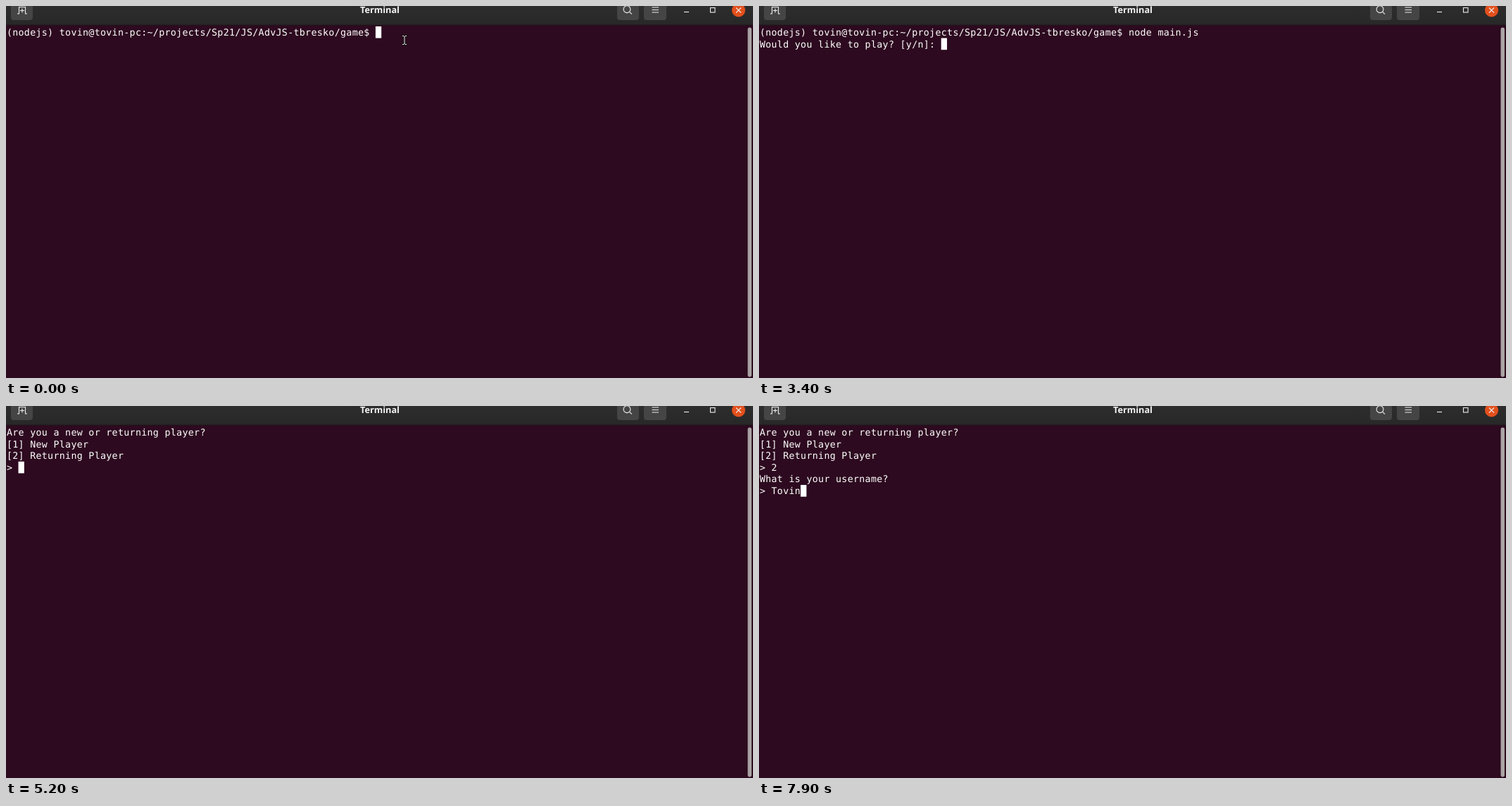
Recreate the animation shown at these times as an HTML page. Size 1061 px wide and 528 px high, loop 8 s.

```html
<!DOCTYPE html>
<html lang="en">
<head>
<meta charset="utf-8">
<title>Terminal</title>
<style>
  html, body { margin: 0; width: 100%; height: 100%; overflow: hidden; background: #2d0a1f; }
  svg { display: block; width: 100vw; height: 100vh; }
  text { fill: #fff; white-space: pre; text-rendering: geometricPrecision; }
  .title { font: bold 12.7px "Noto Sans", "Open Sans", sans-serif; fill: #f4f4f4; text-anchor: middle; }
  #screen text { font: 16px "DejaVu Sans Mono", monospace; letter-spacing: .368px; }
  .button { fill: #454545; }
  .icon { fill: none; stroke: #eee; stroke-width: 1.1; }
</style>
</head>
<body>
<svg viewBox="0 0 1061 528">
  <defs>
    <linearGradient id="bar" x2="0" y2="1">
      <stop stop-color="#2d2d2d"/>
      <stop offset="1" stop-color="#282828"/>
    </linearGradient>
  </defs>
  <rect width="1061" height="528" fill="#2d0a1f"/>
  <rect width="1061" height="27" fill="url(#bar)"/>
  <rect y="26.5" width="1061" height="1" fill="#1e171b"/>

  <g class="button">
    <rect x="7" y="-10" width="31" height="30" rx="4"/>
    <rect x="868" y="-10" width="31" height="30" rx="4"/>
    <rect x="906" y="-10" width="32" height="30" rx="4"/>
  </g>
  <text class="title" x="531" y="10.4">Terminal</text>
  <circle cx="1040.5" cy="6" r="9.5" fill="#e2501d"/>
  <g class="icon">
    <path d="M16 11h2.5V1.5h9V11H30M23 3.5v6M20 6.5h6"/>
    <circle cx="882" cy="4.7" r="4.9"/>
    <path d="M885.6 8.3l3.4 3.4"/>
    <path d="M917.5 2h9.5M917.5 5.5h9.5M917.5 9h9.5"/>
    <path d="M963 8.5h7"/>
    <rect x="1000.5" y="2.5" width="6.5" height="6.5"/>
    <path d="M1037 2.5l7 7M1044 2.5l-7 7"/>
  </g>

  <rect x="1053.5" y="30.5" width="5.5" height="496" rx="2.75" fill="#aaa3a5"/>

  <!-- Character cells are 10 by 20 units -->
  <g id="screen" transform="translate(.9 28.9) scale(.8317)">
    <g id="rows"></g>
    <rect id="caret" width="10" height="20" fill="#fff"/>
  </g>
  <g id="pointer" fill="none">
    <path d="M562.5 42.5h2.5l1 1 1-1h2.5M566 43v11M562.5 54.5h2.5l1-1 1 1h2.5" stroke="#111" stroke-width="2.6"/>
    <path d="M563 42.5h2l1 1 1-1h2M566 43v11M563 54.5h2l1-1 1 1h2" stroke="#eee"/>
  </g>
</svg>
<script>
const LOOP = 8000;
const ROWS = 7;
const prompt = "(nodejs) tovin@tovin-pc:~/projects/Sp21/JS/AdvJS-tbresko/game$ ";
const started = prompt + "node main.js\n";
const question = started + "Would you like to play? [y/n]: ";
const levels = question + "y\nChoose a difficulty:\n[1] Easy\n[2] Medium\n[3] Hard\n> ";
const players = "Are you a new or returning player?\n[1] New Player\n[2] Returning Player\n> ";
const login = players + "2\nWhat is your username?\n> ";

// [start in ms, screen text, caret hidden]
const steps = [
  [0, prompt],
  [700, prompt + "no"],
  [800, prompt + "nod"],
  [1200, prompt + "node "],
  [1700, prompt + "node m"],
  [1800, prompt + "node main.js "],
  [2200, started],
  [2800, question, true],
  [3400, question],
  [4000, question, true],
  [4100, levels],
  [4700, levels, true],
  [5000, levels + "1"],
  [5200, players],
  [5800, players, true],
  [6400, players],
  [6500, players + "2"],
  [6800, login],
  [7300, login + "T"],
  [7700, login + "To"],
  [7800, login + "Tovi"],
  [7900, login + "Tovin"]
];

const byId = id => document.getElementById(id);
const caret = byId("caret");
const pointer = byId("pointer");
const rows = Array.from({ length: ROWS }, (_, i) => {
  const row = document.createElementNS(caret.namespaceURI, "text");
  row.setAttribute("y", 20 * i + 15.7);
  return byId("rows").appendChild(row);
});

let shown;

function show(step) {
  if (step === shown) return;
  shown = step;
  const [, text, hidden] = step;
  const lines = text.split("\n");
  rows.forEach((row, i) => { row.textContent = lines[i] || ""; });
  caret.setAttribute("x", 10 * lines.at(-1).length);
  caret.setAttribute("y", 20 * (lines.length - 1));
  caret.style.visibility = hidden ? "hidden" : "visible";
}

function draw() {
  const time = performance.now() % LOOP;
  show(steps.findLast(([start]) => start <= time));
  pointer.style.visibility = time < 400 ? "visible" : "hidden";
  requestAnimationFrame(draw);
}
draw();
</script>
</body>
</html>
```
